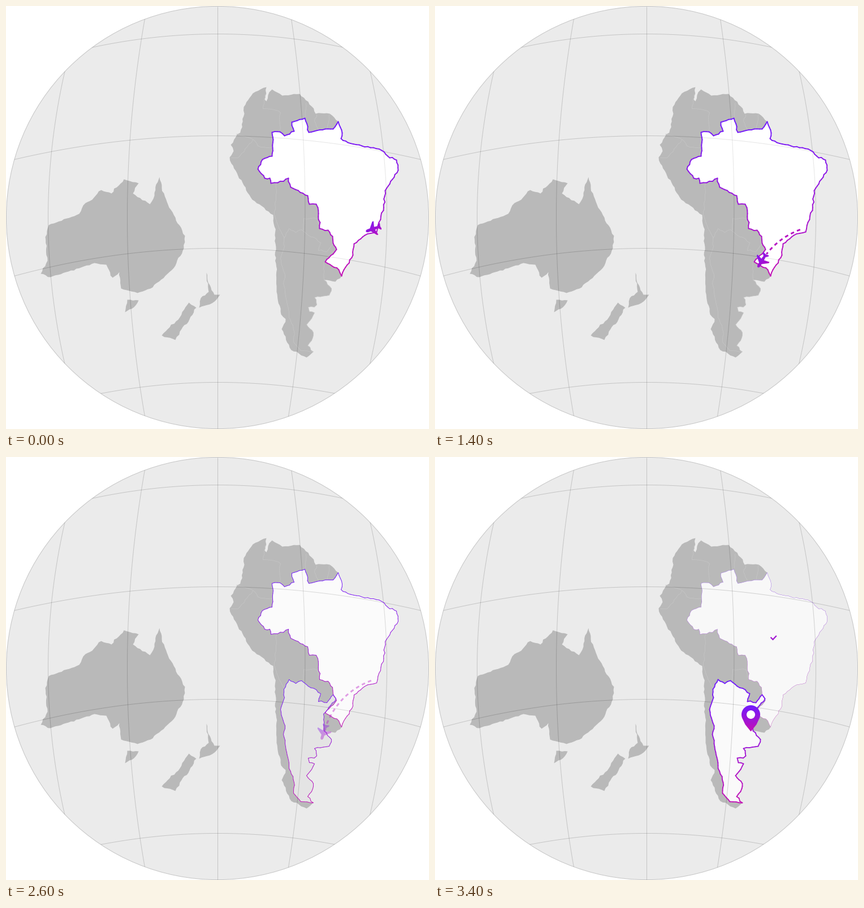
A matplotlib script for the animation above (4000 ms loop, 748 px wide and 748 px high).

```python
import numpy as np
import matplotlib.pyplot as plt
from matplotlib.animation import FuncAnimation
from matplotlib.collections import LineCollection
from matplotlib.patches import Circle, Polygon
from matplotlib.path import Path

SIZE, DPI = 748, 100
PX = 72 / DPI
FRAMES, STEP = 20, 200
FLIGHT_END, FADE_END, PIN_AT = 10, 15, 17

LAND, SEA, BORDER = "#b9b9b9", "#ebebeb", "#c5c5c5"
VIOLET = np.array([112, 28, 255]) / 255
MAGENTA = np.array([196, 14, 182]) / 255

rng = np.random.default_rng(7)


def rough(*keys, amp=0.8, step=5):
    """Join key points by lines that waver like a coast."""
    keys = np.array(keys, float)
    parts = []
    for a, b in zip(keys[:-1], keys[1:]):
        length = np.hypot(*(b - a))
        n = max(1, round(length / step))
        normal = np.array([a[1] - b[1], b[0] - a[0]]) / length
        sway = rng.normal(0, amp, n)
        sway[0] = 0
        t = np.arange(n)[:, None] / n
        parts.append(a + (b - a) * t + normal * sway[:, None])
    return np.vstack(parts + [keys[-1:]])


def island(*keys):
    return rough(*keys, keys[0])


# Coasts and frontiers; neighbours share a piece so their edges agree
br_coast = rough(
    (587, 204), (594, 224), (592, 234), (604, 241), (629, 247), (664, 255),
    (678, 268), (690, 272), (693, 290), (670, 326), (667, 361), (659, 382),
    (655, 399), (634, 405), (615, 420), (613, 440), (597, 466), (593, 477))
br_south = rough((593, 477), (588, 466), (564, 452), (584, 430), (578, 419))
br_west = rough(
    (578, 419), (577, 407), (569, 396), (554, 393), (551, 356), (548, 350),
    (536, 350), (533, 335), (503, 320), (499, 304), (480, 312), (468, 313),
    (466, 304), (457, 304), (445, 288), (453, 271), (470, 265), (472, 236),
    (470, 223))
br_north = rough(
    (470, 223), (484, 222), (492, 229), (509, 221), (505, 205), (528, 198),
    (535, 223), (564, 217), (578, 217), (587, 204))
uy_coast = rough((593, 477), (582, 487), (562, 484))
ar_north = rough(
    (500, 393), (512, 400), (522, 395), (556, 418), (552, 432), (567, 434),
    (578, 420), (583, 427), (561, 454), (562, 484))
ar_coast = rough(
    (562, 484), (575, 499), (571, 511), (545, 515), (549, 528), (534, 532),
    (536, 540), (545, 542), (540, 552), (531, 563), (543, 577), (542, 586),
    (533, 600), (543, 611))
ar_andes = rough(
    (543, 611), (521, 609), (508, 594), (509, 575), (500, 545), (494, 512),
    (490, 490), (493, 480), (485, 446), (492, 425), (491, 410), (500, 393))
pacific = rough(
    (543, 611), (531, 621), (504, 608), (491, 580), (487, 571), (494, 553),
    (486, 545), (478, 505), (476, 410), (472, 369), (435, 342), (398, 278),
    (395, 267), (402, 256), (397, 245), (415, 218), (421, 190), (420, 178),
    (436, 154), (460, 143))
caribbean = rough(
    (460, 143), (457, 165), (460, 168), (465, 152), (470, 147), (488, 158),
    (519, 155), (540, 177), (547, 190), (572, 190), (587, 204))

australia = island(
    (271, 302), (275, 321), (288, 356), (316, 406), (314, 428), (296, 463),
    (259, 497), (232, 507), (217, 503), (203, 499), (200, 470), (188, 480),
    (177, 457), (156, 454), (110, 469), (78, 479), (61, 473), (73, 450),
    (69, 408), (75, 387), (129, 367), (140, 348), (152, 342), (168, 325),
    (186, 331), (208, 306), (234, 313), (224, 331), (254, 350), (262, 335),
    (265, 315))
tasmania = island((214, 519), (234, 520), (226, 532), (210, 541))
nz_north = island((354, 471), (360, 493), (368, 510), (378, 510), (364, 525),
                  (341, 533), (344, 516), (358, 505))
nz_south = island((323, 524), (336, 533), (322, 558), (307, 575), (299, 590),
                  (275, 582), (307, 550))

brazil_path = np.vstack([br_coast, br_south, br_west, br_north])
argentina_path = np.vstack([ar_north, ar_coast, ar_andes])
continent = np.vstack([br_coast, uy_coast, ar_coast, pacific, caribbean])
frontiers = [
    rough((457, 156), (454, 181), (470, 182), (485, 188), (484, 220)),
    rough((407, 226), (434, 234), (450, 249), (471, 250)),
    rough((398, 268), (410, 268), (436, 236)),
    rough((530, 171), (529, 196)),
    rough((549, 191), (545, 203), (552, 220)),
    rough((571, 190), (568, 216)),
    rough((478, 313), (474, 368), (481, 388), (492, 410)),
    rough((525, 396), (526, 375), (550, 376), (552, 390)),
    argentina_path,
]

# Half of the plane, nose first: (along the heading, sideways)
HALF_PLANE = [
    (14, 0), (13.2, 1.7), (11, 2.6), (5.5, 2.7), (-2.5, 12.6), (-5, 12.6),
    (-2.5, 2.7), (-8.5, 2.1), (-12.3, 6), (-14.3, 5.6), (-13, 0)]


def blend(a, b, t):
    return a + (b - a) * t


def grey(level):
    return (level / 255,) * 3


fig = plt.figure(figsize=(SIZE / DPI, SIZE / DPI), dpi=DPI, facecolor="white")
ax = fig.add_axes([0, 0, 1, 1])
# Whole numbers fall on pixel centres
ax.set_xlim(-0.5, SIZE - 0.5)
ax.set_ylim(SIZE - 0.5, -0.5)
ax.axis("off")


def fill(points, color, z):
    return ax.add_patch(Polygon(points, fc=color, ec="none", zorder=z))


def gradient_outline(points, z):
    segments = np.stack([points, np.roll(points, -1, axis=0)], axis=1)
    mid = segments[:, :, 1].mean(axis=1)
    t = (mid - mid.min()) / np.ptp(mid)
    return ax.add_collection(LineCollection(
        segments, colors=blend(VIOLET, MAGENTA, t[:, None]),
        capstyle="round", zorder=z))


def gradient_image(box, slant, z):
    """Gradient running down, or diagonally when slant is above 0."""
    x0, x1, y0, y1 = box
    v, u = np.mgrid[0:1:64j, 0:1:64j]
    t = (v + slant * u) / (1 + slant)
    return ax.imshow(blend(VIOLET, MAGENTA, t[..., None]), aspect="auto",
                     extent=(x0, x1, y1, y0), zorder=z)


def bow(s, ends, values):
    """Parabola through two ends and the value at the globe's middle."""
    fit = np.polyfit([ends[0], 373.5, ends[1]], values, 2)
    return np.polyval(fit, s)


def grid_lines():
    s = np.linspace(0, SIZE, 200)
    meridians = [((113, 635), (104, 74, 104)), ((22, 725), (245, 214, 245)),
                 ((0, SIZE), (373, 373, 373)),
                 ((22, 725), (504, 528.3, 499)), ((113, 633), (643, 673, 643))]
    parallels = [((153, 595), (72.5, 49, 72.5)), ((14, 733), (271, 229, 271)),
                 ((14, 733), (477, 428, 477)), ((166, 583), (685, 665, 685))]
    return ([np.c_[bow(s, *m), s] for m in meridians]
            + [np.c_[s, bow(s, *p)] for p in parallels])


def add_grid(clip, alpha, z):
    grid = LineCollection(grid_lines(), colors="black", alpha=alpha,
                          linewidths=PX, zorder=z)
    ax.add_collection(grid)
    grid.set_clip_path(clip)
    return grid


# Globe and land
globe = Circle((373.5, 373.5), 373.5, fc=SEA, ec="#c6c6c6", lw=PX, zorder=0)
ax.add_patch(globe)
for shape in (australia, tasmania, nz_north, nz_south, continent):
    fill(shape, LAND, 1)
ax.add_collection(LineCollection(frontiers, colors=BORDER,
                                 linewidths=0.8 * PX, zorder=2))

argentina = fill(argentina_path, LAND, 3)
add_grid(globe, 0.16, 4)
brazil = fill(brazil_path, "white", 5)
brazil_grid = add_grid(brazil, 0.1, 6)
brazil_edge = gradient_outline(brazil_path, 7)
argentina_edge = gradient_outline(argentina_path, 8)

# Flight path, measured by length
T = np.linspace(0, 1, 400)[:, None]
ROUTE = ((1 - T) ** 2 * [649, 393.5] + 2 * T * (1 - T) * [583, 417]
         + T ** 2 * [561.5, 486])
DIST = np.r_[0, np.cumsum(np.hypot(*np.diff(ROUTE, axis=0).T))]
DASH, PERIOD, FIRST, TAIL = 6.2, 11.8, 4, 14


def on_route(s):
    return np.c_[np.interp(s, DIST, ROUTE[:, 0]),
                 np.interp(s, DIST, ROUTE[:, 1])]


def dashes(end):
    return [on_route(np.linspace(s, min(s + DASH, end), 6))
            for s in np.arange(FIRST, max(end, FIRST), PERIOD)]


def plane_at(s):
    center = on_route([s])[0]
    a, b = on_route([max(s - 1, 0), min(s + 1, DIST[-1])])
    ahead = (b - a) / np.hypot(*(b - a))
    side = np.array([-ahead[1], ahead[0]])
    other = [(u, -v) for u, v in HALF_PLANE[-2::-1]]
    return center, np.array([center + u * ahead + v * side
                             for u, v in HALF_PLANE + other])


trail = LineCollection([], colors="#b814c4", linewidths=3 * PX,
                       capstyle="butt", zorder=9)
ax.add_collection(trail)
plane = gradient_image((0, 1, 0, 1), 0.8, 10)

# Pin and check mark
PIN_X, PIN_Y, PIN_R, PIN_TIP = 558, 455, 16.5, 485
ang = np.radians(np.linspace(150, 390, 60))
head = np.c_[PIN_X + PIN_R * np.cos(ang), PIN_Y + PIN_R * np.sin(ang)]
pin_path = Path(np.vstack([head, [(568, 472.5), (PIN_X, PIN_TIP),
                                  (548, 472.5), head[0]]]))
pin = gradient_image((541, 575, 438, 485), 0, 12)
pin.set_clip_path(pin_path, ax.transData)
hole = Circle((PIN_X, PIN_Y), 7.5, fc="white", ec="none", zorder=13)
ax.add_patch(hole)
check, = ax.plot([593, 597, 603.3], [318.3, 322.3, 315.6], color="#a016d2",
                 lw=2.2 * PX, solid_joinstyle="miter",
                 solid_capstyle="butt", zorder=12)


def update(i):
    flight = min(i / FLIGHT_END, 1)
    fade = np.clip((i - FLIGHT_END) / (FADE_END - FLIGHT_END), 0, 1)
    settled = i > FADE_END

    s = flight * DIST[-1]
    (x, y), outline = plane_at(s)
    plane.set_extent((x - 15, x + 15, y + 15, y - 15))
    plane.set_clip_path(Path(outline), ax.transData)
    trail.set_segments(dashes(s - TAIL))
    for part in (plane, trail):
        part.set_alpha(1 - fade)
        part.set_visible(fade < 1)

    brazil.set_facecolor(grey(255 - 7 * fade))
    brazil_grid.set_alpha(0.1 + 0.06 * fade)
    brazil_edge.set_linewidth((0.25 if settled else 1.9 - 1.55 * fade) * PX)
    argentina.set_facecolor(grey(250 if settled else 185 + 63 * fade ** 0.75))
    argentina_edge.set_linewidth((1.8 if settled else 2 * fade ** 1.5) * PX)
    for part in (argentina, argentina_edge):
        part.set_visible(fade > 0)

    for part in (pin, hole, check):
        part.set_visible(i >= PIN_AT)
    return []


anim = FuncAnimation(fig, update, frames=FRAMES, init_func=lambda: [],
                     interval=STEP, repeat=True, repeat_delay=0)
plt.show()
```
